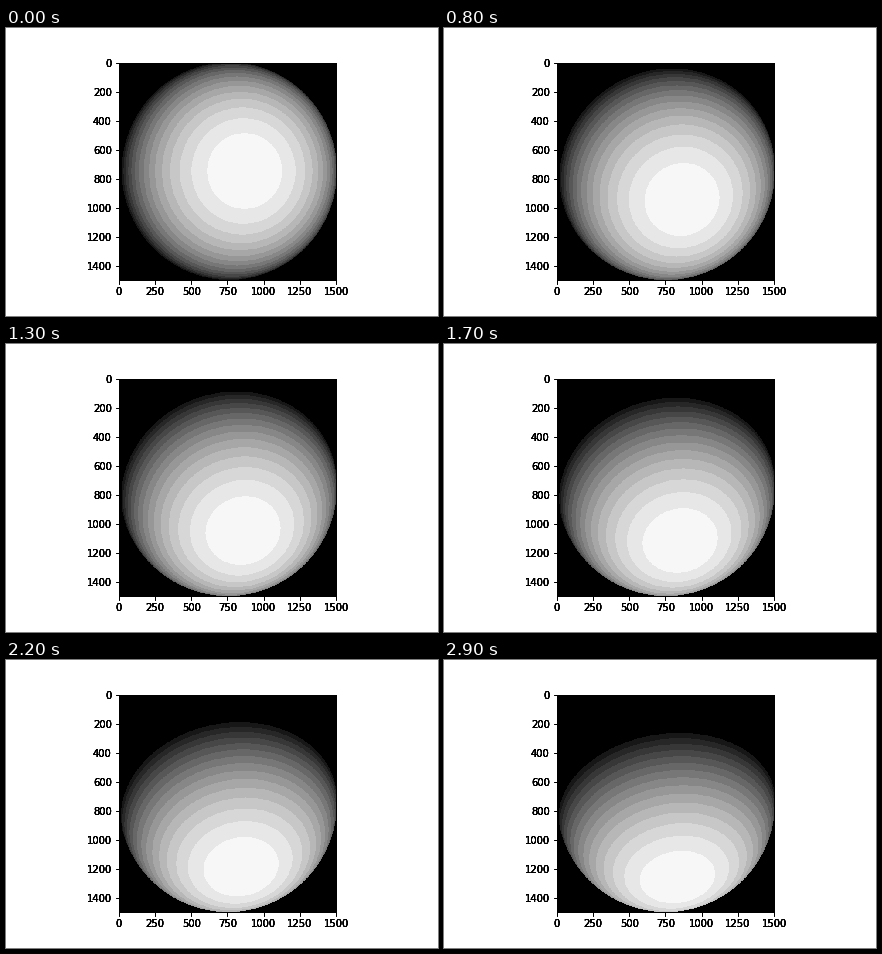
A matplotlib script for the animation above (3000 ms loop, 432x288 px).

```python
import numpy as np
import matplotlib.pyplot as plt
from matplotlib.animation import FuncAnimation

FRAMES = 30
SIZE = 1500
LEVELS = 16
LAYERS = 5  # repeated outlines turn soft edges into solid black

plt.rcParams.update({"font.family": "DejaVu Sans", "font.size": 10})

# Unit normals of the sphere, sampled on every third pixel
coords = (np.arange(SIZE)[1::3] + 0.5) / (SIZE / 2) - 1
nx, ny = np.meshgrid(coords, coords)
inside = nx**2 + ny**2 <= 1
nz = np.sqrt(np.clip(1 - nx**2 - ny**2, 0, None))


def shade(i):
    """Banded Lambert shading; the light slides down as i grows."""
    light = np.array([0.165, 0.0367 * i, 1.0])
    lx, ly, lz = light / np.linalg.norm(light)
    lit = np.where(inside, nx * lx + ny * ly + nz * lz, 0)
    band = np.clip(np.floor(lit * LEVELS), 0, LEVELS - 1)
    return np.where(band > 0, 16 * band + 7, 0)


def add_axes(fig):
    ax = fig.add_axes([0.125, 0.125, 0.775, 0.755])
    ax.patch.set_visible(False)
    ax.set_aspect("equal")
    ax.set_xlim(0, SIZE)
    ax.set_ylim(SIZE, 0)
    ax.set_xticks(range(0, 1501, 250))
    ax.set_yticks(range(0, 1401, 200))
    return ax


fig = plt.figure(figsize=(6, 4), dpi=72, facecolor="white")
axes = [add_axes(fig) for _ in range(LAYERS)]
image = axes[0].imshow(shade(0), cmap="gray", vmin=0, vmax=255,
                       interpolation="nearest", extent=(0, SIZE, SIZE, 0))


def update(i):
    image.set_data(shade(i))
    return [image]


anim = FuncAnimation(fig, update, frames=FRAMES, interval=100,
                     repeat=True, repeat_delay=0, blit=False)
plt.show()
```
